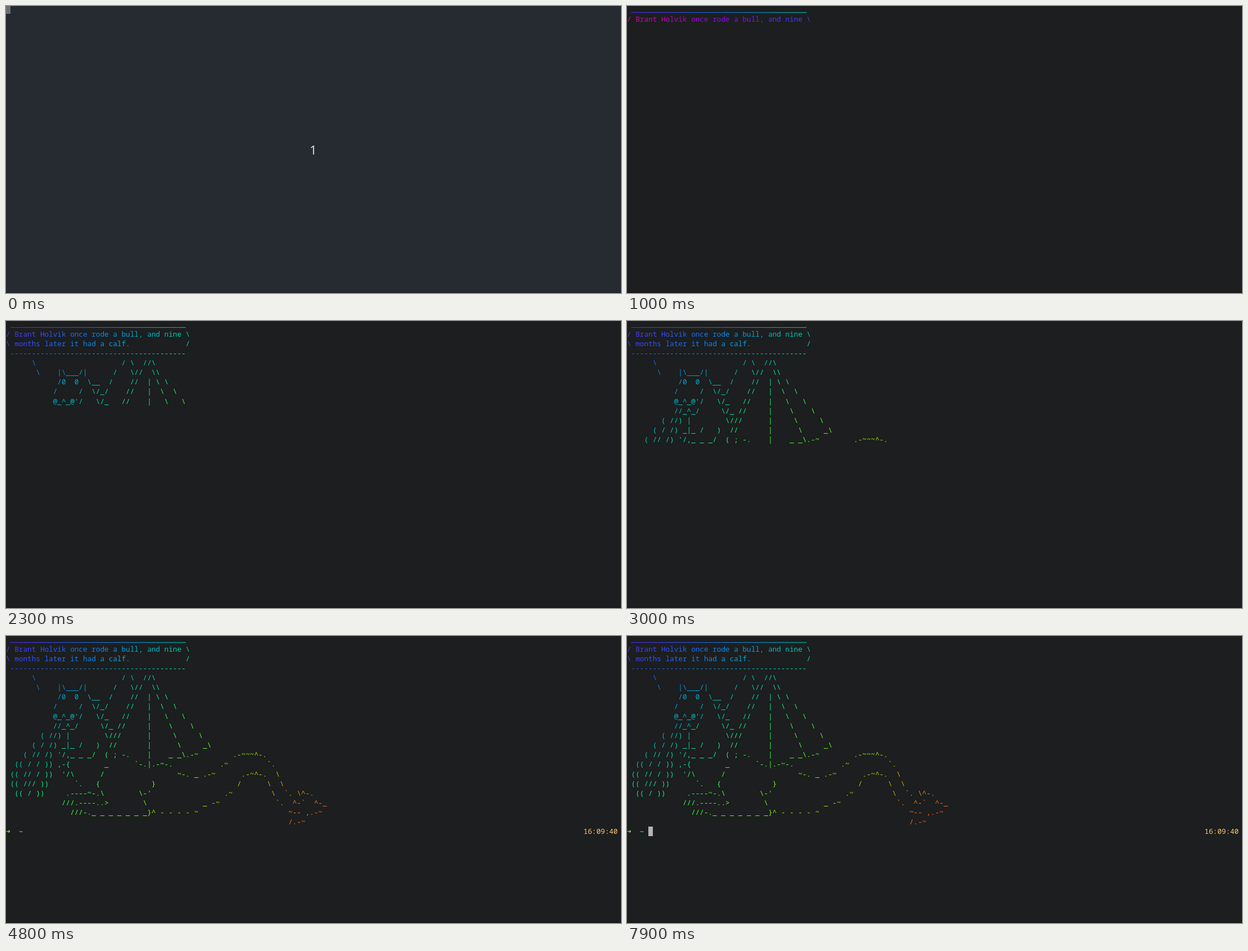
These frames come from a looping animation (1094x512 px, 8000 ms). An HTML page with a canvas:

```html
<!DOCTYPE html>
<html lang="en">
<head>
<meta charset="utf-8">
<title>Rainbow terminal</title>
<style>
  html, body { margin: 0; width: 100%; height: 100%; overflow: hidden; background: #1c1e1f; }
  canvas { display: block; }
</style>
</head>
<body>
<canvas id="stage" width="1094" height="512"></canvas>
<script type="text/plain" id="art">
 _________________________________________
/ Brant Holvik once rode a bull, and nine \
\ months later it had a calf.             /
 -----------------------------------------
      \                    / \  //\
       \    |\___/|      /   \//  \\
            /0  0  \__  /    //  | \ \
           /     /  \/_/    //   |  \  \
           @_^_@'/   \/_   //    |   \   \
           //_^_/     \/_ //     |    \    \
        ( //) |        \///      |     \     \
      ( / /) _|_ /   )  //       |      \     _\
    ( // /) '/,_ _ _/  ( ; -.    |    _ _\.-~        .-~~~^-.
  (( / / )) ,-{        _      `-.|.-~-.           .~         `.
 (( // / ))  '/\      /                 ~-. _ .-~      .-~^-.  \
 (( /// ))      `.   {            }                   /      \  \
  (( / ))     .----~-.\        \-'                 .~         \  `. \^-.
             ///.----..>        \             _ -~             `.  ^-`  ^-_
               ///-._ _ _ _ _ _ _}^ - - - - ~                     ~-- ,.-~
                                                                  /.-~
</script>
<script>
const LOOP = 8000, FRAME = 100;
const CELL_W = 7.61, CELL_H = 17.15, TOP = -3, BASELINE = 13.4;
const FONT = '12.68px "Noto Sans Mono", "DejaVu Sans Mono", monospace';

// Each line cycles through its hues, then the next line starts.
const FIRST_LINE = 778, LINE_TIME = 171, CYCLES = 7, SPREAD = 3, FREQ = 0.1, PHASE = 3.42;

const lines = document.getElementById('art').textContent.replace(/^\n|\n$/g, '').split('\n');
const ctx = document.getElementById('stage').getContext('2d', { alpha: false });

function rainbow(angle) {
  const channel = shift => Math.round(Math.sin(angle + shift * 2 * Math.PI / 3) * 127 + 128);
  return `rgb(${channel(0)},${channel(1)},${channel(2)})`;
}

function put(text, row, col, color) {
  ctx.fillStyle = color;
  [...text].forEach((char, i) => {
    if (char !== ' ') ctx.fillText(char, (col + i) * CELL_W, TOP + row * CELL_H + BASELINE);
  });
}

function background(color, edge) {
  ctx.fillStyle = color;
  ctx.fillRect(0, 0, 1094, 512);
  ctx.fillStyle = edge;
  ctx.fillRect(0, 510, 1094, 2);
}

function cursor(x, y, width, height, color = '#b4b4b4') {
  ctx.fillStyle = color;
  ctx.fillRect(x, y, width, height);
}

function drawCountdown() {
  background('#262b31', '#21252b');
  cursor(0, 0, 8, 14, '#6c6f73');
  ctx.font = '22px "Noto Sans", sans-serif';
  ctx.textAlign = 'center';
  ctx.fillStyle = '#d3dae3';
  ctx.fillText('1', 546.5, 265);
  ctx.textAlign = 'left';
}

function drawLine(text, row, time) {
  const age = time - FIRST_LINE - row * LINE_TIME;
  if (age < 0) return;
  const cycle = Math.min(CYCLES, Math.floor(age / LINE_TIME * CYCLES) + 1);
  const offset = row - (CYCLES - cycle) * SPREAD;
  [...text].forEach((char, col) =>
    put(char, row, col, rainbow(PHASE + FREQ * (offset + col / SPREAD))));
}

function drawPrompt(time) {
  ctx.font = 'bold ' + FONT;
  put('➜', 20, 0, '#6af04c');
  put('~', 20, 3, '#4fc3ee');
  ctx.font = FONT;
  put('16:09:40', 20, 135, '#ffc473');
  const blinks = [[4400, 4800], [5400, 6400], [6900, 7400], [7900, 8000]];
  if (blinks.some(([on, off]) => time >= on && time < off)) cursor(38, 340, 8, 17);
}

function draw(time) {
  if (time < 400) return drawCountdown();
  background('#1c1e1f', '#1a1a1d');
  ctx.font = FONT;
  if (time < 700) cursor(0, 0, 8, 14);
  lines.forEach((text, row) => drawLine(text, row, time));
  if (time >= 4400) drawPrompt(time);
  else if (time >= 4200) cursor(0, 340, 8, 17);
}

const start = performance.now();
function tick() {
  const time = (performance.now() - start) % LOOP;
  draw(Math.floor(time / FRAME) * FRAME);
  requestAnimationFrame(tick);
}
tick();
</script>
</body>
</html>
```
